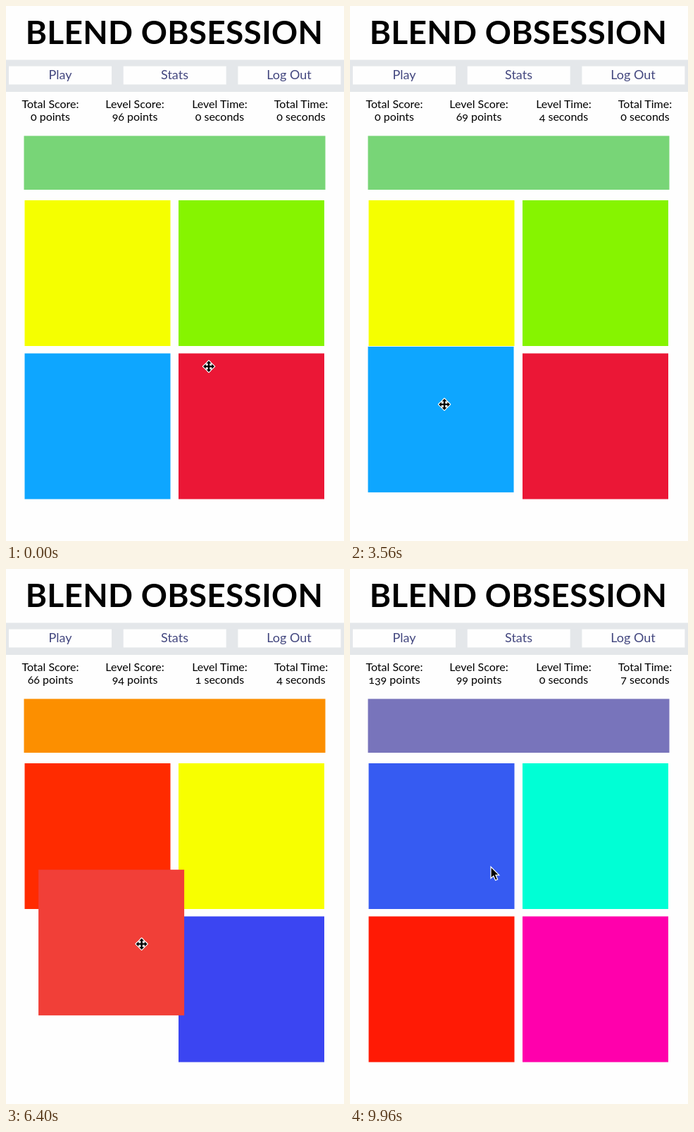
Recreate the animation shown at these times as an HTML page. Size 480 by 760 pixels, loop 10 s.

```html
<!DOCTYPE html>
<html lang="en">
<head>
<meta charset="utf-8">
<title>Color matching game</title>
<style>
  html, body { margin: 0; width: 100%; height: 100%; overflow: hidden; background: #fefefe; }
  svg { display: block; width: 480px; height: 760px; }
  text { font-family: Lato, "Open Sans", sans-serif; font-size: 16px; text-anchor: middle; font-variant-numeric: oldstyle-nums; }
  .title { font-size: 46px; font-weight: 700; letter-spacing: .3px; }
  .nav text { font-size: 18px; fill: #43477f; }
</style>
</head>
<body>
<svg viewBox="0 0 480 760">
  <rect width="480" height="760" fill="#fefefe"/>
  <text class="title" x="239" y="54">BLEND OBSESSION</text>
  <rect y="76.5" width="480" height="45.5" fill="#e4e7ea"/>
  <g class="nav" id="nav"></g>
  <g id="stats"></g>
  <rect id="goal" x="25.5" y="184.5" width="428" height="76.5"/>
  <text id="note" x="239.5" y="730"></text>
  <g id="tiles"></g>
  <g id="arrow">
    <path id="tip" d="M0 0V16.5L3.8 13L6.6 19.2L9.6 17.9L6.9 11.8H11.8Z" stroke="#fff" stroke-width="1.2"/>
  </g>
  <g id="move"></g>
</svg>
<script>
const LOOP = 10000, REVERT = 500, NOTE = 1000, PAUSE = 1060, REST = 600, GLIDE = 400;
const $ = id => document.getElementById(id);

function add(parent, tag, attrs, label) {
  const el = document.createElementNS("http://www.w3.org/2000/svg", tag);
  for (const k in attrs) el.setAttribute(k, attrs[k]);
  if (label) el.textContent = label;
  return parent.appendChild(el);
}

const put = (el, x, y) => el.setAttribute("transform", `translate(${x.toFixed(2)} ${y.toFixed(2)})`);
const setText = (el, s) => { if (el.textContent !== s) el.textContent = s; };
const swing = p => 0.5 - Math.cos(Math.PI * Math.min(1, Math.max(0, p))) / 2;
const mix = (a, b, p) => a.map((v, i) => v + (b[i] - v) * p);

// A drag grabs a tile at a point and carries it by an offset.
const drag = (tile, from, to, at, by) => ({ tile, from, to, at, by, end: [at[0] + by[0], at[1] + by[1]] });

// Each level has one wrong drop, then the right one.
const levels = [
  { goal: "#78d577", colors: ["#f5ff00", "#86f400", "#0ea6ff", "#eb1736"],
    miss: drag(3, 1100, 1600, [288, 571], [-187, -209]),
    hit: drag(2, 3460, 4080, [135, 575.5], [-15, -150]) },
  { goal: "#fc8f00", colors: ["#ff2b00", "#f8ff00", "#f13f38", "#3b45f2"],
    miss: drag(2, 6100, 6700, [173, 599], [39, -132]),
    hit: drag(0, 7700, 8560, [140, 419], [240, -6]) },
  { goal: "#7874bb", colors: ["#365bf2", "#00ffd5", "#ff1a05", "#ff00ac"] }
];
const drags = levels.flatMap(l => l.hit ? [l.miss, l.hit] : []);
const first = [288, 512], last = [200, 423];

function tally(lv, t) {
  const spent = Math.min(t, lv.hit ? lv.hit.to : LOOP) - lv.begin;
  const penalty = lv.miss && t >= lv.miss.to ? 10 : 0;
  return { score: 100 - Math.floor(spent / 200) - penalty, secs: Math.floor(spent / 1000) };
}

Object.assign(levels[0], { begin: -820, points: 0, secs: 0 });
levels.slice(1).forEach((lv, i) => {
  const prev = levels[i], got = tally(prev, LOOP);
  lv.begin = prev.hit.to + PAUSE;
  lv.points = prev.points + got.score;
  lv.secs = prev.secs + got.secs;
});

const column = i => 26.5 + 218.5 * (i % 2);
const row = i => 276 + 217.5 * (i >> 1);

["Play", "Stats", "Log Out"].forEach((s, i) => {
  add($("nav"), "rect", { x: 4 + 162.7 * i, y: 85.5, width: 146, height: 26, fill: "#fefefe" });
  add($("nav"), "text", { x: 77 + 162.5 * i, y: 104 }, s);
});

const values = [["Total Score:", 63], ["Level Score:", 183], ["Level Time:", 303.5], ["Total Time:", 419]]
  .map(([s, x]) => {
    add($("stats"), "text", { x, y: 144.5 }, s);
    return add($("stats"), "text", { x, y: 162.5 });
  });

const tiles = [0, 1, 2, 3].map(() => add($("tiles"), "rect", { width: 207, height: 207 }));

// Four-way cursor: one arm turned around the centre, outline below.
for (const look of [{ stroke: "#fff", "stroke-width": 2.4, "stroke-linejoin": "round" }, {}])
  for (let a = 0; a < 360; a += 90)
    add($("move"), "path", { d: "M0 -8L3.5 -4.3H1.2V0H-1.2V-4.3H-3.5Z", transform: `rotate(${a})`, ...look });

// After a drop the pointer rests as an arrow, then glides to the next grab.
function pointer(t) {
  const next = drags.find(d => t < d.to);
  const prev = drags.filter(d => t >= d.to).pop();
  if (next && t >= next.from)
    return { pos: mix(next.at, next.end, swing((t - next.from) / (next.to - next.from))) };
  const leave = (prev ? prev.to : -REST / 2) + REST;
  return {
    pos: mix(prev ? prev.end : first, next ? next.at : last, swing((t - leave) / GLIDE)),
    plain: prev && (!next || t < leave)
  };
}

function draw(t) {
  const lv = levels.filter(l => t >= l.begin).pop();
  const { score, secs } = tally(lv, t);
  const solved = lv.hit && t >= lv.hit.to;
  const erred = lv.miss && t >= lv.miss.to && t < lv.miss.to + NOTE;

  setText(values[0], lv.points + (solved ? score : 0) + " points");
  setText(values[1], score + " points");
  setText(values[2], secs + " seconds");
  setText(values[3], lv.secs + (solved ? secs : 0) + " seconds");
  setText($("note"), solved ? "Correct!" : erred ? "Penalty, wrong answer: -10 points" : "");
  $("goal").setAttribute("fill", lv.goal);

  const { pos, plain } = pointer(t);
  const held = drags.find(d => t >= d.from && t < d.to + REVERT);
  const order = [0, 1, 2, 3];
  if (held) order.push(order.splice(held.tile, 1)[0]);
  order.forEach((n, i) => {
    const grip = held && held.tile === n ? held.at : pos;
    const k = held ? 1 - swing((t - held.to) / REVERT) : 0;
    tiles[i].setAttribute("fill", lv.colors[n]);
    put(tiles[i], column(n) + (pos[0] - grip[0]) * k, row(n) + (pos[1] - grip[1]) * k);
  });

  $("arrow").style.display = plain ? "" : "none";
  $("move").style.display = plain ? "none" : "";
  put($(plain ? "arrow" : "move"), ...pos);
}

const start = performance.now();
function tick(now) {
  draw(Math.max(0, now - start) % LOOP);
  requestAnimationFrame(tick);
}
draw(0);
requestAnimationFrame(tick);
</script>
</body>
</html>
```
